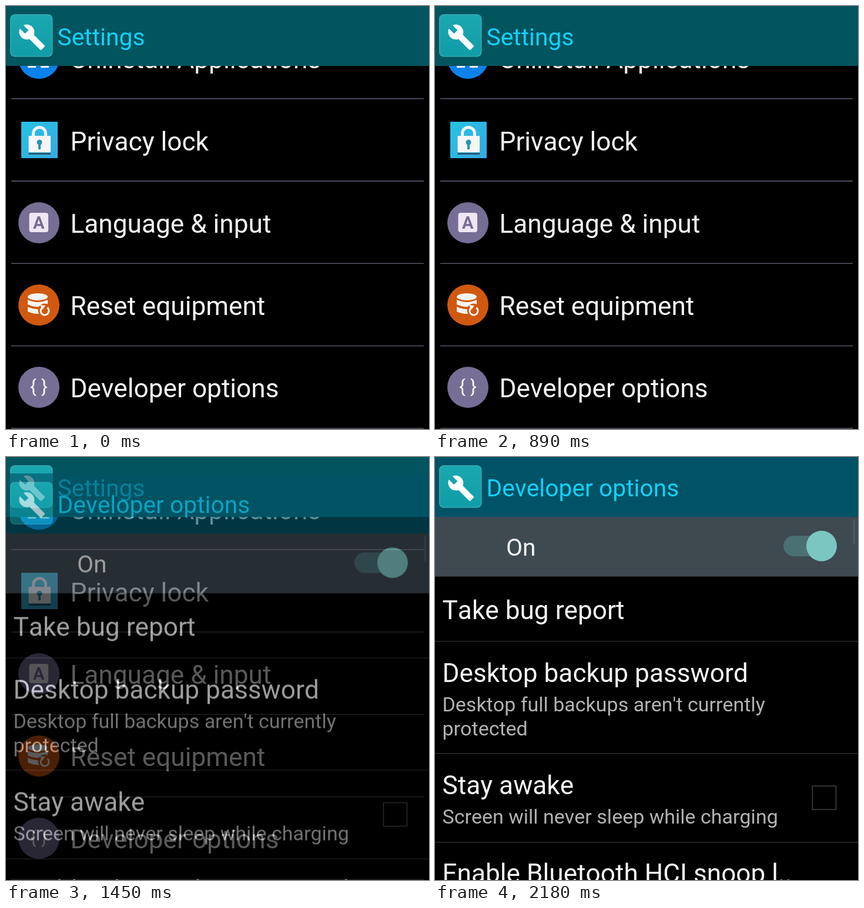
Animation of 720 by 720 pixels, one loop 2.26 s. Source, as an HTML page with a canvas:

```html
<!DOCTYPE html>
<html lang="en">
<head>
<meta charset="utf-8">
<title>Developer options</title>
<style>
html, body { margin: 0; width: 100%; height: 100%; overflow: hidden; background: #000; }
canvas { display: block; width: 720px; height: 720px; }
</style>
</head>
<body>
<canvas id="stage" width="720" height="720"></canvas>
<script>
const SIZE = 720, LOOP = 2260;
const PRESS = 1010, RELEASE = 1320, OPEN = 1290;
const SLIDE = { time: 705, dist: 103 }, FADE = 400;
const WHITE = '#f6f6f6', LILAC = '#766e94';
const wrench = new Path2D('M22.7 19l-9.1-9.1c.9-2.3.4-5-1.5-6.9-2-2-5-2.4-7.4-1.3L9 6 6 9 1.6 4.7C.4 7.1.9 10.1 2.9 12.1c1.9 1.9 4.6 2.4 6.9 1.5l9.1 9.1c.4.4 1 .4 1.4 0l2.3-2.3c.5-.4.5-1.1.1-1.4z');

function layer(paint) {
  const c = document.createElement('canvas');
  c.width = c.height = SIZE;
  const g = c.getContext('2d');
  g.fontKerning = 'none';
  rect(g, 0, 0, SIZE, SIZE, '#000');
  paint(g);
  return c;
}

function rect(g, x, y, w, h, color, r = 0) {
  g.fillStyle = color;
  g.beginPath();
  g.roundRect(x, y, w, h, r);
  g.fill();
}

function disc(g, x, y, r, color) {
  g.fillStyle = color;
  g.beginPath();
  g.arc(x, y, r, 0, Math.PI * 2);
  g.fill();
}

function text(g, str, x, y, size, color = WHITE, weight = 400, align = 'left') {
  g.font = `${weight} ${size}px Roboto, sans-serif`;
  g.textAlign = align;
  g.fillStyle = color;
  g.fillText(str, x, y);
}

function header(g, title, color) {
  rect(g, 0, 0, SIZE, 102, color);
  const fill = g.createLinearGradient(0, 14, 0, 86);
  fill.addColorStop(0, '#1ca8b0');
  fill.addColorStop(1, '#109ca8');
  rect(g, 7, 14, 72.5, 72.5, '#36aab2', 8);
  rect(g, 8.5, 15.5, 69.5, 69.5, fill, 7);
  g.save();
  g.translate(20.5, 29.3);
  g.scale(1.98, 1.98);
  g.fillStyle = '#fff';
  g.fill(wrench);
  g.restore();
  text(g, title, 87.5, 67, 40.8, '#14d0fa');
}

function appsIcon(g) {
  disc(g, 56, 89, 35, '#0a82ea');
  for (const x of [37, 59]) rect(g, x, 91, 14, 14, WHITE, 1);
}

function lockIcon(g) {
  const fill = g.createLinearGradient(26, 197, 88, 259);
  fill.addColorStop(0, '#24c4e4');
  fill.addColorStop(1, '#38a8e2');
  rect(g, 26, 197, 62, 62, fill, 1);
  g.strokeStyle = WHITE;
  g.lineWidth = 5;
  g.beginPath();
  g.moveTo(46.5, 223);
  g.lineTo(46.5, 217);
  g.arc(57, 217, 10.5, Math.PI, 0);
  g.lineTo(67.5, 223);
  g.stroke();
  rect(g, 38.5, 221, 37.5, 28, WHITE, 1);
  rect(g, 38.5, 250, 37.5, 3, '#2b5a70');
  disc(g, 57, 232, 4.5, '#2793b4');
  rect(g, 55, 233, 4, 11, '#2793b4');
}

function inputIcon(g) {
  disc(g, 56, 369, 35, LILAC);
  rect(g, 39.5, 352, 32.5, 33, '#eee6f2', 4);
  text(g, 'A', 55.8, 379, 29, LILAC, 700, 'center');
}

function resetIcon(g) {
  const base = '#d0590f';
  disc(g, 56, 509, 35, base);
  g.fillStyle = WHITE;
  g.beginPath();
  g.ellipse(54, 495, 17, 6, 0, 0, Math.PI * 2);
  g.fill();
  for (const y of [502, 514]) {
    g.fillStyle = WHITE;
    g.beginPath();
    g.moveTo(37, y - 2);
    g.quadraticCurveTo(54, y + 6, 71, y - 2);
    g.lineTo(71, y + 6);
    g.quadraticCurveTo(54, y + 14, 37, y + 6);
    g.fill();
  }
  disc(g, 66, 518, 11.5, base);
  g.strokeStyle = WHITE;
  g.lineWidth = 3;
  g.beginPath();
  g.arc(66, 519, 7, -0.9, 4.1);
  g.stroke();
  g.fillStyle = WHITE;
  g.beginPath();
  g.moveTo(58, 509);
  g.lineTo(67, 510);
  g.lineTo(62, 517);
  g.fill();
}

function codeIcon(g) {
  disc(g, 56, 649, 35, LILAC);
  text(g, '{', 46.5, 658, 32, WHITE, 400, 'center');
  text(g, '}', 65.5, 658, 32, WHITE, 400, 'center');
}

function settings(g, pressed) {
  if (pressed) rect(g, 0, 579.5, SIZE, 139, '#2e2b38');
  const rows = ['Uninstall Applications', 'Privacy lock', 'Language & input',
    'Reset equipment', 'Developer options'];
  rows.forEach((name, i) => {
    text(g, name, 109.5, 105.5 + i * 140.2, 44.2);
    rect(g, 9, 156.8 + i * 140.3, 702, 1.6, '#5a5268');
  });
  for (const icon of [appsIcon, lockIcon, inputIcon, resetIcon, codeIcon]) icon(g);
  header(g, 'Settings', '#02545e');
}

function developer(g) {
  header(g, 'Developer options', '#005366');
  rect(g, 0, 102, SIZE, 101.5, '#3e4950');
  text(g, 'On', 121, 168, 40.8);
  rect(g, 593, 134, 80, 35, '#4a7074', 17.5);
  disc(g, 658, 151.5, 26, '#7cc6c2');
  rect(g, 711.5, 106, 3.5, 43, '#4e5a62');

  const x = 12.5, grey = '#b2b2b2';
  text(g, 'Take bug report', x, 276, 44.2);
  text(g, 'Desktop backup password', x, 382.5, 44.2);
  text(g, "Desktop full backups aren't currently", x, 433, 34, grey);
  text(g, 'protected', x, 473.5, 34, grey);
  text(g, 'Stay awake', x, 573.5, 44.2);
  text(g, 'Screen will never sleep while charging', x, 624, 34, grey);
  text(g, 'Enable Bluetooth HCI snoop l..', x, 724, 44.2);
  for (const y of [313, 504, 655]) rect(g, 0, y, SIZE, 1.2, '#34323a');
  g.strokeStyle = '#403e46';
  g.lineWidth = 1.6;
  g.strokeRect(642.5, 560, 40, 40);
}

const idle = layer(g => settings(g, false));
const held = layer(g => settings(g, true));
const options = layer(developer);
const ctx = document.getElementById('stage').getContext('2d');

// The picture advances in 80 ms ticks, two of them 10 ms longer.
function tick(t) {
  const slack = t >= 1850 ? 20 : t >= 640 ? 10 : 0;
  const n = Math.floor((t - slack) / 80);
  return n * 80 + (n > 22 ? 20 : n > 7 ? 10 : 0);
}

const easeOut = (p, power) => 1 - Math.pow(1 - Math.min(1, Math.max(0, p)), power);

function draw(now) {
  const t = tick(now % LOOP);
  ctx.globalAlpha = 1;
  ctx.drawImage(t >= PRESS && t < RELEASE ? held : idle, 0, 0);
  if (t > OPEN) {
    const age = t - OPEN;
    const shift = SLIDE.dist * (1 - easeOut(age / SLIDE.time, 5));
    ctx.globalAlpha = easeOut(age / FADE, 2);
    ctx.drawImage(options, 0, shift < 0.4 ? 0 : shift);
    // Keep the header colour up to the top edge once the panel is opaque.
    if (ctx.globalAlpha === 1) rect(ctx, 0, 0, SIZE, shift + 1, '#005366');
  }
}

let start;
function loop(now) {
  start ??= now;
  draw(Math.max(0, now - start));
  requestAnimationFrame(loop);
}
draw(0);
requestAnimationFrame(loop);
</script>
</body>
</html>
```
